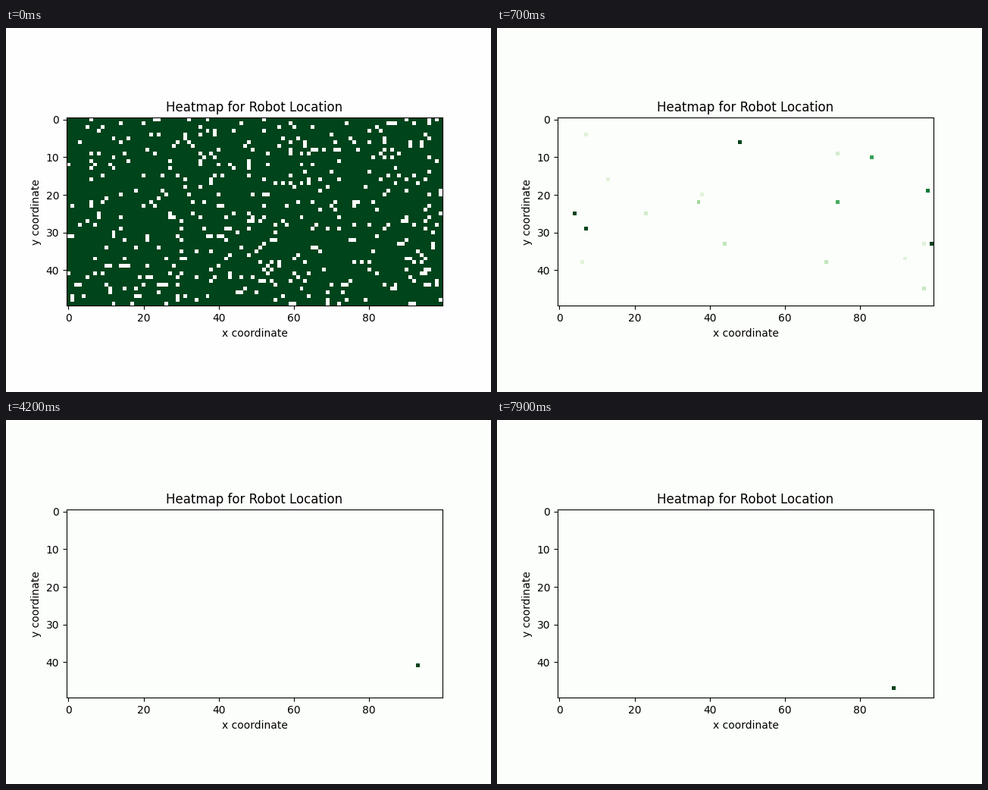
A matplotlib script that plays this animation: 640 px wide and 480 px high, repeating every 8 s.

```python
import numpy as np
import matplotlib.pyplot as plt
from matplotlib.animation import FuncAnimation

ROWS, COLS, FRAMES = 50, 100, 80
PALE = "#fbfefa"

# Key points of the robot's walk: time step, x, y.
WALK = np.array([(0, 95, 34), (7, 99, 33), (15, 96, 32), (27, 92, 38),
                 (32, 92, 39), (37, 92, 39), (42, 93, 41), (57, 89, 43),
                 (58, 88, 43), (68, 90, 43), (77, 89, 45), (79, 89, 47)])
STEPS = np.arange(FRAMES)
PATH = np.column_stack(
    [np.rint(np.interp(STEPS, WALK[:, 0], WALK[:, k])) for k in (1, 2)]
).astype(int)

# Strongest rival cells (x, y, shade) and the step at which they stand there.
EARLY = 7, [(48, 6, 1), (4, 25, 1), (7, 29, 1), (99, 33, 1), (98, 19, 0.82)]
LATE = 15, [(53, 8, 1), (57, 28, 1), (6, 29, 0.72), (92, 36, 0.72)]
SWITCH, LOCKED, SETTLED = 12, 20, 27

rng = np.random.default_rng(7)
blocked = rng.random((ROWS, COLS)) < 0.085
tone = rng.random((ROWS, COLS))
rank = rng.random((ROWS, COLS))
rank[blocked] = 1
rank[-2:] = 1


def put(grid, x, y, shade):
    x, y = np.clip(x, 0, COLS - 1), np.clip(y, 0, ROWS - 1)
    grid[y, x] = np.fmax(grid[y, x], shade)


def put_guesses(grid, n):
    """Random cells that thin out, pale and drift along with the robot."""
    share = max(0.085 * 0.45 ** (n - 2), 0.0045)
    shades = 0.14 + 0.76 * tone ** (0.25 * np.clip(n - 2, 0, 4) ** 2)
    if n <= 2:
        shades[rank >= share] = 0.15
        shades[rank < 0.005] = 1
        share *= 1.45
    dx, dy = PATH[n] - PATH[2]
    for y, x in np.argwhere(rank < share):
        put(grid, x + dx, y + dy, shades[y, x])


def put_rivals(grid, n):
    step, cells = EARLY if n < SWITCH else LATE
    dx, dy = PATH[n] - PATH[step]
    for x, y, shade in cells:
        put(grid, x + dx, y + dy, shade)
    put(grid, *PATH[n], 0.55)


def belief(n):
    grid = np.full((ROWS, COLS), np.nan)
    if n == 0:
        grid[~blocked] = 1
        return grid
    if n < SETTLED:
        put_guesses(grid, n)
        if n > 2:
            put_rivals(grid, n)
    if n >= LOCKED:
        grid *= 0.65 ** (n - LOCKED + 1)
        grid[grid < 0.05] = np.nan
        put(grid, *PATH[n], 1)
    # A sideways step leaves a faint echo on the cell just left.
    if n >= SETTLED and PATH[n, 0] != PATH[n - 1, 0]:
        put(grid, *PATH[n - 1], 0.2)
    return grid


fig, ax = plt.subplots(figsize=(6.4, 4.8), dpi=100)
im = ax.imshow(belief(0), cmap="Greens", vmin=0, vmax=1, interpolation="nearest")
ax.set_title("Heatmap for Robot Location")
ax.set_xlabel("x coordinate")
ax.set_ylabel("y coordinate")


def update(n):
    back = "#fefefe" if n == 0 else PALE
    fig.set_facecolor(back)
    ax.set_facecolor(back)
    im.set_data(np.ma.masked_invalid(belief(n)))
    return [im]


anim = FuncAnimation(fig, update, frames=FRAMES, interval=100,
                     repeat=True, repeat_delay=0)
plt.show()
```
